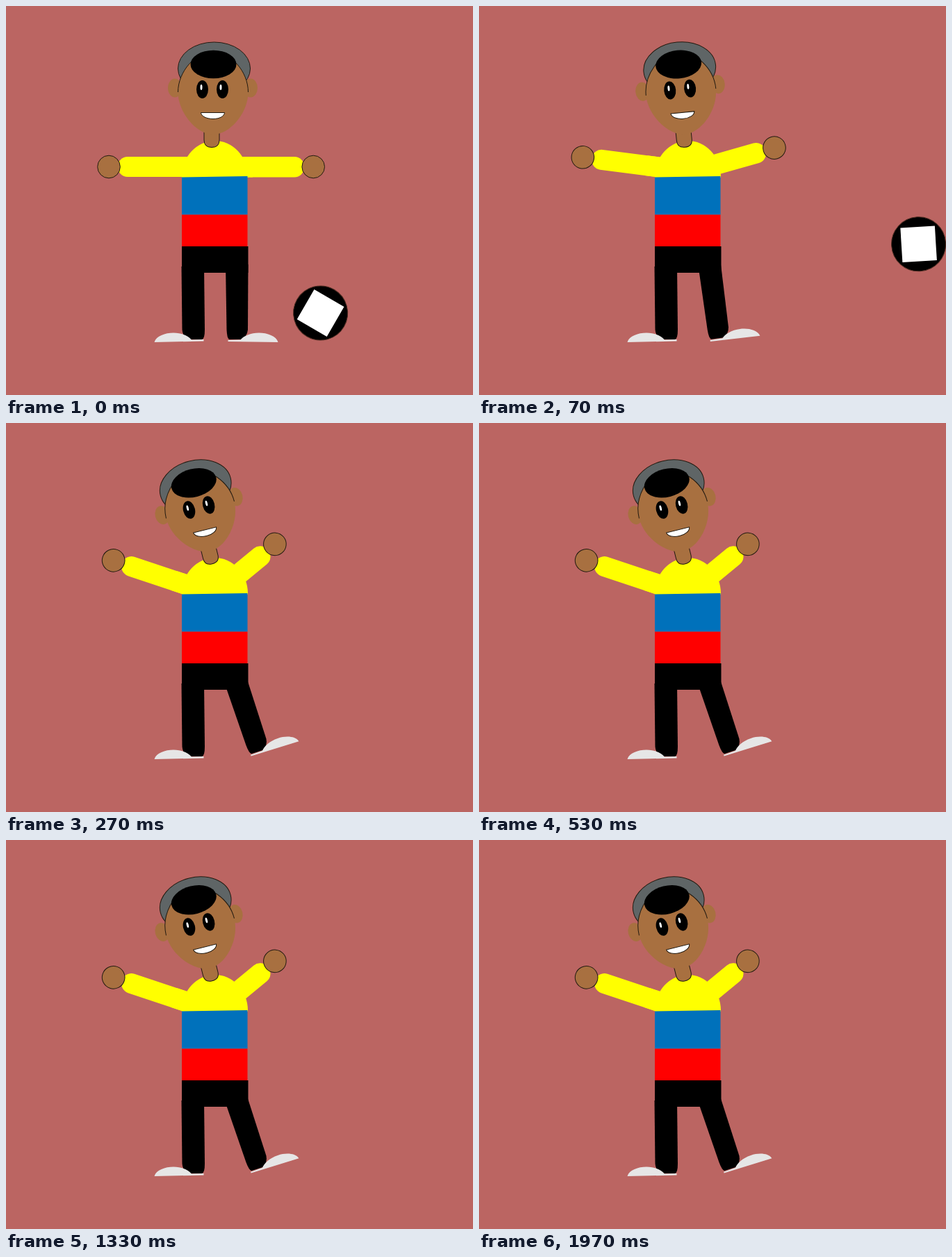
Recreate the animation shown at these times as an HTML page. Size 672 by 560 pixels, loop 2 s.

```html
<!DOCTYPE html>
<html>
<head>
<meta charset="utf-8">
<style>
html, body { margin: 0; width: 100%; height: 100%; overflow: hidden; background: #bb6562; }
svg { display: block; width: 672px; height: 560px; }
.skin { fill: #a87040; }
.line { stroke: #221a10; stroke-width: 1; }
.yellow { fill: #ff0; }
.shoe { fill: #e6e6e6; }
</style>
</head>
<body>
<svg viewBox="0 0 672 560">
  <rect width="672" height="560" fill="#bb6562"/>

  <g id="armL">
    <rect class="yellow" x="161" y="217" width="114" height="29" rx="14"/>
    <rect class="yellow" x="240" y="217" width="35" height="29"/>
    <circle class="skin line" cx="148" cy="231.5" r="16.3"/>
  </g>
  <g id="armR">
    <rect class="yellow" x="320" y="217" width="109" height="29.5" rx="14"/>
    <rect class="yellow" x="320" y="217" width="35" height="29.5"/>
    <circle class="skin line" cx="442.2" cy="231.5" r="16.3"/>
  </g>

  <g>
    <path d="M252.5 375H285L286 466Q286 479 282 480H264Q254 476 253.5 466Z"/>
    <path class="shoe" d="M213.5 484C216 475 229 470.5 241 470.5C253 470.5 263 475 267 480.5L284.5 480V482.5Z"/>
  </g>
  <g id="legR">
    <path d="M316 372H348.5L348 466Q347 476 338 480H321Q318 478 317.5 466Z"/>
    <path class="shoe" d="M391.5 484C389 475 376 470.5 364 470.5C352 470.5 342 475 337.5 480.5L319.5 481V483Z"/>
  </g>

  <path class="yellow" d="M253 246A47.5 51.5 0 0 1 348 245V247H253Z"/>
  <path fill="#0071bb" d="M253 246.5L347.5 245V300.5H253Z"/>
  <path fill="#f00" d="M253 300.5H347.5V346H253Z"/>
  <path d="M253 346H348.5V384H253Z"/>

  <g id="head">
    <ellipse class="line" cx="299.5" cy="90" rx="52" ry="38" fill="#5f6566"/>
    <ellipse class="skin" cx="243" cy="118" rx="10" ry="13.5"/>
    <ellipse class="skin" cx="352" cy="118" rx="10" ry="13.5"/>
    <path class="skin line" d="M285 178V193Q285 203.5 296 203.5Q307 203.5 307 193V178Z"/>
    <path class="skin" d="M247.5 124C247.5 94 273 66 298 66S348.500 94 348.500 124S322 185 298 185S247.500 153 247.500 124Z"/>
    <path class="line" fill="none" d="M247.500 124C247.500 94 273 66 298 66S348.500 94 348.500 124"/>
    <ellipse cx="298.500" cy="84" rx="33" ry="20.300"/>
    <ellipse cx="282.500" cy="120" rx="8.500" ry="13"/>
    <ellipse cx="311.500" cy="120" rx="8.500" ry="13"/>
    <ellipse cx="281" cy="117" rx="1.500" ry="4" fill="#fff"/>
    <ellipse cx="309" cy="117" rx="1.500" ry="4" fill="#fff"/>
    <path class="line" fill="#fff" d="M280.500 153.500H314.500C314 159 307 162.500 298 162.500C289 162.500 281 159 280.500 153.500Z"/>
  </g>

  <g id="ball">
    <circle r="39" stroke="#4a2a20"/>
    <rect x="-24.800" y="-24.800" width="49.600" height="49.600" fill="#fff"/>
  </g>
</svg>
<script>
// Each joint: pivot x, pivot y, degrees per step
const joints = {
  armL: [254.7, 235, 3.7],
  armR: [335, 280, -7.9],
  legR: [325.5, 377.5, -3.63],
  head: [293.4, 200, -2.8]
};
const place = (id, transform) =>
  document.getElementById(id).setAttribute('transform', transform);

function draw(ms) {
  // 60 steps per 2 s loop, starting on 10 ms ticks
  const step = Math.floor((Math.floor(ms % 2000 / 10) + 0.5) * 0.3);
  const swing = Math.min(step, 5);
  for (const [id, [x, y, rate]] of Object.entries(joints))
    place(id, `rotate(${rate * swing} ${x} ${y})`);
  place('ball', `translate(${452.6 + 90 * step} ${442 - 49.6 * step}) rotate(${30 - 16.75 * step})`);
}

let start;
function tick(now) {
  start ??= now;
  draw(now - start);
  requestAnimationFrame(tick);
}
draw(0);
requestAnimationFrame(tick);
</script>
</body>
</html>
```
